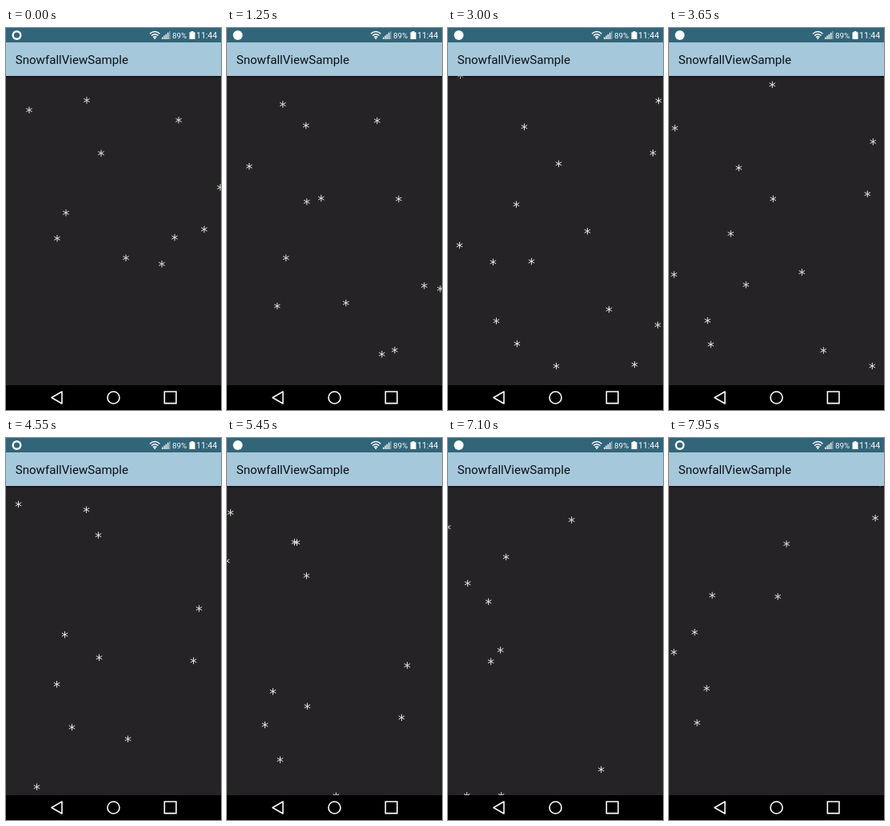
Write an HTML page that moves like this. It is 269 px wide and 478 px high and loops after 8000 ms.

```html
<!DOCTYPE html>
<html lang="en">
<head>
<meta charset="utf-8">
<title>Snowfall</title>
<style>
  html, body { margin: 0; width: 100%; height: 100%; overflow: hidden; background: #252326; }
  svg { display: block; width: 269px; height: 478px; }
  text { font-family: Roboto, "Noto Sans", sans-serif; }
</style>
</head>
<body>
<svg viewBox="0 0 269 478" xmlns="http://www.w3.org/2000/svg">
  <defs>
    <path id="flake" d="M0-4.2V4.2M-3.7-2.1L3.7 2.1M-3.7 2.1L3.7-2.1" stroke="#e6e6e6" stroke-width="1"/>
    <linearGradient id="shade" x2="0" y2="1">
      <stop stop-color="#000" stop-opacity=".5"/>
      <stop offset="1" stop-color="#000" stop-opacity="0"/>
    </linearGradient>
  </defs>

  <rect width="269" height="478" fill="#252326"/>
  <g id="snow"></g>

  <rect y="60" width="269" height="3" fill="url(#shade)"/>
  <rect y="18" width="269" height="42" fill="#a5c8db"/>
  <rect width="269" height="18" fill="#316579"/>
  <text x="11.7" y="45" font-size="15.1" fill="#0d1113">SnowfallViewSample</text>

  <g fill="#fff">
    <circle cx="13.5" cy="9" r="6"/>
    <circle id="hole" cx="13.5" cy="9" r="3.6" fill="#316579"/>
    <path d="M180 7.2Q186.2 1.8 192.4 7.2M182 9.5Q186.2 5.9 190.4 9.5M184 11.6Q186.2 9.8 188.4 11.6"
          fill="none" stroke="#fff" stroke-width="1.5"/>
    <circle cx="186.2" cy="13" r="1.1"/>
    <path d="M195 11.5h1.4v2.5h-1.4zM197.3 9.6h1.4V14h-1.4zM199.6 7.7h1.4V14h-1.4zM201.9 5.8h1.4V14h-1.4z"/>
    <path d="M204.2 4h1.2v10h-1.2z" opacity=".5"/>
    <text x="208" y="13" font-size="9.8">89%</text>
    <path d="M231.5 4h3v1.2h2V14h-7V5.2h2z"/>
    <text x="238" y="13" font-size="10.5">11:44</text>
  </g>

  <rect y="447" width="269" height="31" fill="#000"/>
  <g fill="none" stroke="#fff" stroke-width="1.6" stroke-linejoin="round">
    <path d="M57 462.5L70 455V470Z"/>
    <circle cx="134.5" cy="462.5" r="7.5"/>
    <path d="M198.3 455h14.6v14.6h-14.6z" stroke-linejoin="miter"/>
  </g>
</svg>
<script>
const LOOP = 8, STEP = 0.05;     // seconds
const TOP = 55.3, UNIT = 11.28;  // entry height, pixels per second for speed 1
const CADENCE = 0.4134;          // seconds between two flakes
const snow = document.getElementById('snow');
const hole = document.getElementById('hole');
const flakes = [];

// Flakes enter one by one from the given time on, each with a lane and a speed.
function shower(start, ...list) {
  list.forEach(([lane, speed], i) => {
    const node = document.createElementNS('http://www.w3.org/2000/svg', 'use');
    node.setAttribute('href', '#flake');
    snow.append(node);
    flakes.push({ node, lane, speed, born: start + i * CADENCE });
  });
}

shower(-5.15, [150, 4]);
shower(-3.9, [75, 4], [248, 5], [64, 6], [195, 8], [119, 4], [211, 10], [268, 9], [277, 7]);
shower(-0.84, [29, 5]);
shower(-0.76,
  [216, 7], [101, 9], [100, 5], [189, 7], [71, 10], [153, 6], [271, 7], [110, 7],
  [278, 7], [30, 9], [152, 5], [137, 4], [52, 7], [140, 8], [57, 8], [159, 5],
  [111, 9], [86, 6], [241, 10], [252, 8], [363, 9], [369, 5]);

// All flakes share one wind, which slowly turns to the left.
const wind = t => 2 * t - 122 * (1 - Math.cos(Math.PI * t / 16));

function draw(now) {
  const t = Math.floor(now / 1000 % LOOP / STEP + 1e-6) * STEP;
  for (const { node, lane, speed, born } of flakes) {
    const x = lane + wind(t);
    const y = TOP + speed * UNIT * (t - born);
    node.setAttribute('transform', `translate(${x.toFixed(2)} ${y.toFixed(2)})`);
  }
  const recording = Math.floor(t + 0.2 + 1e-6) % 2;
  hole.setAttribute('visibility', recording ? 'hidden' : 'visible');
  requestAnimationFrame(draw);
}
draw(performance.now());
</script>
</body>
</html>
```
